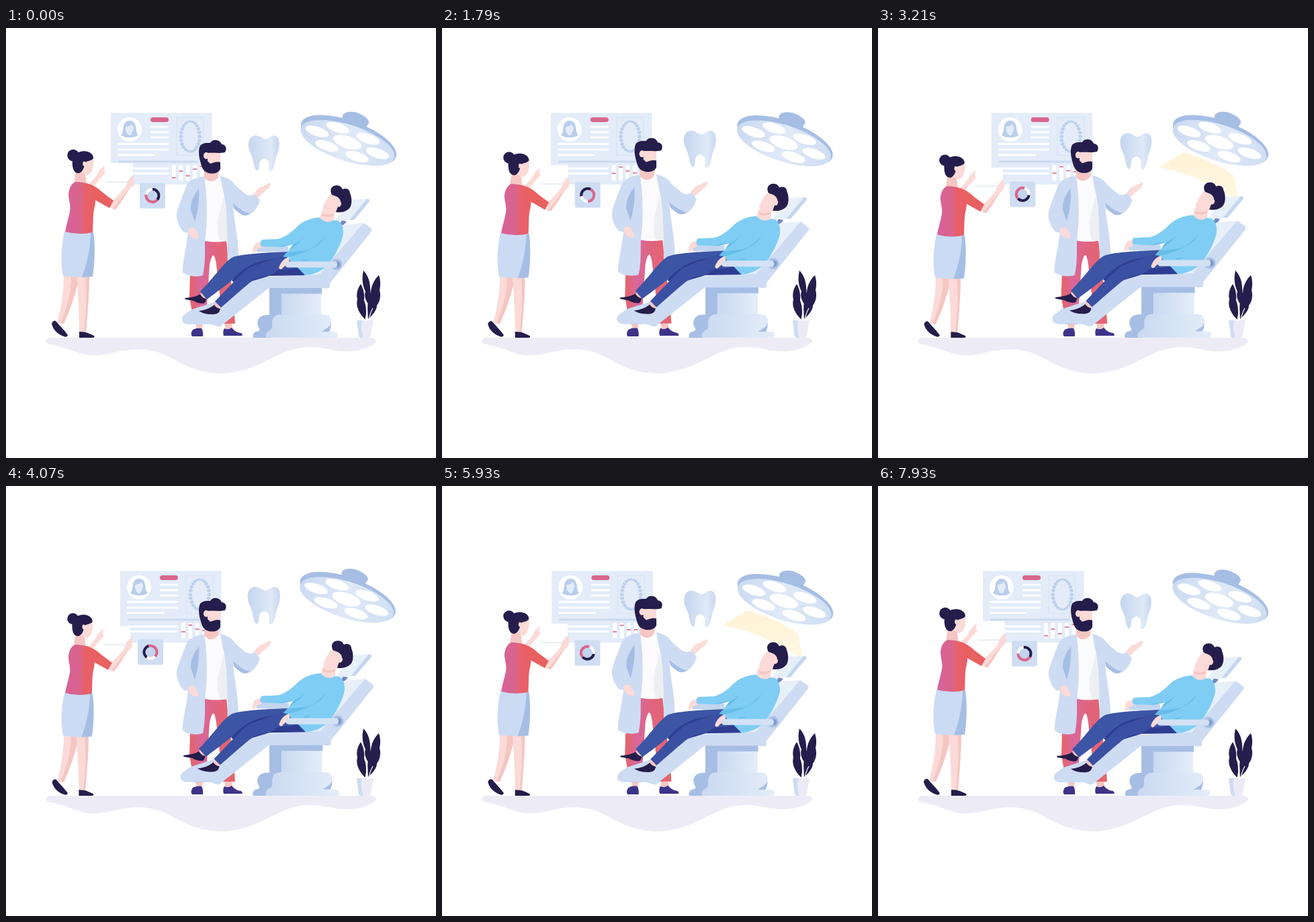
These frames come from a looping animation (640x640 px, 8000 ms). An HTML page:

```html
<!DOCTYPE html>
<html lang="en">
<head>
<meta charset="utf-8">
<title>Dental clinic</title>
<style>
  html, body { margin: 0; width: 100%; height: 100%; overflow: hidden; background: #fff; }
  svg { display: block; width: 100vw; height: 100vh; }
  .skin { fill: #fbdad7; }
  .skin2 { fill: #f5c6c3; }
  .dark { fill: #251d4b; }
  .blue { fill: #cddcf3; }
  .deep { fill: #a6bee4; }
  .pale { fill: #e7eff9; }
  .white { fill: #fff; }
</style>
</head>
<body>
<svg viewBox="0 0 640 640" xmlns="http://www.w3.org/2000/svg">
  <defs>
    <linearGradient id="tooth-fill">
      <stop offset="0" stop-color="#c5d6ef"/><stop offset=".72" stop-color="#dfe9f7"/><stop offset="1" stop-color="#c6d7f0"/>
    </linearGradient>
    <linearGradient id="steel">
      <stop offset="0" stop-color="#c9d9f1"/><stop offset="1" stop-color="#e4edf9"/>
    </linearGradient>
    <linearGradient id="lamp-fill">
      <stop offset="0" stop-color="#cbdaf2"/><stop offset=".5" stop-color="#dfe9f7"/><stop offset="1" stop-color="#cfdef3"/>
    </linearGradient>
    <linearGradient id="top-fill">
      <stop offset="0" stop-color="#d7629a"/><stop offset=".54" stop-color="#d9648a"/><stop offset=".6" stop-color="#e8616b"/><stop offset="1" stop-color="#e85f65"/>
    </linearGradient>
    <linearGradient id="pants-fill">
      <stop offset="0" stop-color="#e5646a"/><stop offset=".1" stop-color="#e06479"/><stop offset=".25" stop-color="#d9679b"/><stop offset=".55" stop-color="#e06580"/><stop offset="1" stop-color="#e7636a"/>
    </linearGradient>
    <linearGradient id="beam-fill" x2="0" y2="1">
      <stop offset="0" stop-color="#fff3d6"/><stop offset="1" stop-color="#fff7e3"/>
    </linearGradient>
  </defs>

  <path fill="#edecf6" d="M64 461H545Q552 463 551 467C540 479 515 484 490 480C470 476 450 471 425 479C395 488 370 511 325 514C280 515 260 497 235 486C210 475 185 478 165 482C140 488 125 489 110 484C90 477 75 472 62 470Q56 465 64 461Z"/>

  <g id="panel">
    <rect x="156" y="126.500" width="150.500" height="106.500" fill="#e3ecf8"/>
    <circle class="white" cx="184" cy="151" r="18"/>
    <path fill="#b9ceec" d="M171 159C175 156 174 150 175 146C177 135 191 135 193 146C194 150 193 156 197 159Q193 163 184 163Q175 163 171 159Z"/>
    <path fill="#e3ecf8" d="M178 147Q185 146 187 143L190 148C190 153 187 156 187 158Q184 162 181 158C179 156 178 153 178 147Z"/>
    <rect x="215" y="133" width="27" height="7" rx="3.500" fill="#d9668c"/>
    <g id="rows" class="white"></g>
    <rect x="167" y="197.500" width="118" height="3" fill="#cbdaf1"/>
    <rect x="254" y="133.500" width="40" height="56" fill="none" stroke="#c6d6ee" stroke-width=".7" stroke-dasharray="1.500 1"/>
    <g id="beads" fill="#bdd0ec"></g>
    <g id="bars"></g>
  </g>

  <g id="card">
    <path class="white" d="M147 201H188.500V237H147Z"/>
    <path fill="#e0e9f6" d="M148 228.500H189V230H148Z"/>
  </g>

  <g id="chart">
    <rect x="199" y="230.500" width="38" height="38" rx="3" fill="#cfddf3"/>
    <circle cx="218" cy="249.500" r="7.500" fill="#c3d4ee"/>
    <g id="donut" fill="none" stroke-width="4"></g>
  </g>

  <g id="doctor">
    <path class="skin2" d="M282 436H293L292 450H284ZM324 436H336L337 449H327Z"/>
    <path fill="#3d3489" d="M278 449Q284 446 291 447Q294 452 293 459H277Q274 455 278 449ZM325 447Q331 450 336 446Q341 453 350 454Q353 457 351 458H324Q322 452 325 447Z"/>
    <path fill="url(#pants-fill)" d="M296 316H328C331 345 334 375 338 400L341 440H323L313 352Q309 325 303 352L297 441H280L273 400L274 366H293Z"/>
    <path fill="#fbfbfd" d="M295 222H322C327 245 330 290 329 317Q312 320 296 317Z"/>
    <path fill="#eeeff3" d="M323 250C321 270 314 280 315 296Q315 310 319 318L329 317C330 290 328 270 323 250Z"/>
    <path class="blue" d="M295 221C284 222 272 226 268 236C262 252 256 266 254 276C253 288 260 300 265 304L271 305C269 325 262 352 263 364C270 370 285 371 293 368C297 350 296 330 296 317C300 290 300 250 295 221Z"/>
    <path class="deep" d="M287 239C278 250 274 262 275 271L281 288C285 276 288 260 287 239Z"/>
    <path class="skin" d="M271 303C270 298 276 296 281 298L286 307Q289 314 284 313.500C277 313 273 310 271 303Z"/>
    <path class="blue" d="M319 220C332 223 337 228 342 235L355 246Q360 250 364 249C367 249 370 248 371 246L378 257C374 268 368 277 358 279C350 277 344 269 338 264C339 285 347 318 346 342L330 352C329 320 331 270 322 238Z"/>
    <path class="deep" d="M338 261C347 269 354 274 363 276Q357 281 351 278C345 274 340 270 339 268Z"/>
    <path class="skin" d="M369 247C374 240 377 236 382 236L391 231Q396 230 393 235L391 239C387 240 386 244 382 246L376 252Z"/>
    <path class="skin2" d="M295 210H317L316 222Q306 234 295 223Z"/>
    <path class="skin" d="M297 183H319V205H297Z"/>
    <path class="dark" d="M289 198C287 190 286 181 289 175C294 170 300 171 304 171C307 165 318 165 321 173C328 174 329 180 326 185C318 187 308 185 300 186V198L304 202C308 201 314 198 319 200V210C316 217 306 218 299 215C292 212 291 205 289 198Z"/>
    <ellipse class="skin" cx="298" cy="190" rx="4" ry="5"/>
  </g>

  <path id="beam" fill="url(#beam-fill)" d="M418 207L455 185C480 193 506 203 528 218Q533 230 537 257L505 240C480 224 450 214 418 207Z"/>

  <g id="chair">
    <path class="deep" d="M392 385H470V396H410V427H392ZM368 461Q366 452 376 451C381 448 372 445 375 435Q378 427 390 427H410L392 461Z"/>
    <path fill="url(#steel)" d="M410 395.500H469V427H410Z"/>
    <path class="deep" d="M470 428H480Q487 440 481 452H468Z"/>
    <path fill="url(#steel)" d="M387 461C385 454 390 451 394 449C399 444 393 437 399 430Q402 426.500 408 426.500H470C480 426 485 432 484 437C483 446 474 448 470 452H489Q495 453 494 457Q494 461 490 461Z"/>
    <path fill="#7389c6" d="M500 286L507 288L501 295L496 293Z"/>
    <path class="pale" d="M511 256L538 254Q542 255 541 258L517 286L490 287Z"/>
    <path fill="#c5d6f0" d="M537 254.500Q542 254 541 258L518 285.500L511 286Z"/>
    <path class="pale" d="M501 293L531 290L480 377L448 368Z"/>
    <path class="blue" d="M532 290L543 298Q546 300 543 304L482 380L482 387L474 388L463 371Z"/>
    <path class="blue" d="M481 387H391L318 445L305 441H272C262 441 259 433 265 427L276 419L310 408L352 372L482 366Z"/>
    <path fill="#c3d5ef" d="M374 325H420V333.500H374Q371 330 374 325Z"/>
    <path class="skin" d="M381 318L372 320Q367 325 367 333Q370 337 374 329L381 326Z"/>
    <path class="skin2" d="M288 397L292 393L301 401L296 405ZM309 412L313 406L321 414L317 419Z"/>
    <path fill="#3c55a5" d="M420 333C392 334 352 336 338 341C325 347 309 373 289 392L299 404C315 392 330 381 338 374L425 362Z"/>
    <path fill="#2e3d91" d="M336 376C350 360 365 350 385 346L428 337L445 368L392 369L345 383Z"/>
    <path fill="#3a50a2" d="M416 336L429 349C437 360 420 359 406 360L392 369C383 369 374 371 363 379C347 392 333 405 320 416L311 407C328 390 345 370 360 358C375 350 395 346 416 336Z"/>
    <path class="dark" d="M266 402C275 401 283 400 289 396Q292 402 298 403Q298 408 294 410Q285 410 279 406L267 404ZM287 421C298 420 305 416 310 412Q313 417 319 418L317 423Q312 427 305 426C298 426 291 424 287 421Z"/>
    <path class="skin" d="M470 272L489 273L488 288Q474 294 466 289Z"/>
    <path class="skin2" d="M471 276Q482 280 489 274L488 279Q478 283 470 279Z"/>
    <path fill="#7fcdf4" d="M467 282C452 283 441 288 433 296C424 305 414 312 405 314L381 315C378 318 378 322 380 325L410 326C418 325 424 321 428 321C424 328 420 332 415 337L445 368C460 367 470 361 478 354C490 340 502 315 502 304C502 294 498 290 495 287L488 286Q477 293 467 282Z"/>
    <path fill="#67bde9" d="M447 305C440 319 423 326 405 325L428 321L421 330Q437 323 447 305ZM483 305C472 311 462 328 446 331L418 334L412 340L445 347C462 344 472 322 483 305Z"/>
    <path fill="#7fcdf4" d="M492 290C503 293 503 305 497 312C485 325 472 338 459 343L424 348L419 341C440 337 458 328 468 320Z"/>
    <path class="skin" d="M421 341C413 343 408 350 406 357Q409 362 413 356L422 349Z"/>
    <ellipse fill="#c6d7f0" cx="491" cy="352" rx="10" ry="9.500"/>
    <circle class="deep" cx="492" cy="352" r="8"/>
    <circle fill="#819bd0" cx="493" cy="352" r="4.500"/>
    <rect x="416" y="347.500" width="77" height="9" rx="4" fill="#d3e1f5"/>
    <path class="skin" d="M486 245C479 251 473 261 471 269Q473 277 484 277L491 275L498 266L497 247Z"/>
    <path class="dark" d="M485 248C480 239 487 233 494 234.500C499 235 500 239 501 240C507 237 512 241 512 246C515 252 515 262 512 267C507 274 498 275 491 274L494 266L498 258C496 250 488 250 485 248Z"/>
    <ellipse class="skin" cx="496" cy="262.500" rx="3" ry="4" transform="rotate(25 496 262)"/>
  </g>

  <path id="tooth" fill="url(#tooth-fill)" d="M361 177C360 164 366 160 372 160C378 160 380 164 386 165.500C391 164 394 160 400 160C406 161 408 170 406 179C405 187 402 190 401 197C399 206 397 213 393 213C390 213 392 205 391 200C390 196 386 194 383.500 194.500C379 195 377 200 377 205C376 211 375 214 373 212C369 209 369 200 367 194C365 187 362 184 361 177Z"/>

  <g id="lamp">
    <path class="deep" d="M501 130C504 124 515 123 525 127C535 131 541 137 540 141L533 153L500 143Z"/>
    <ellipse class="deep" cx="510" cy="166.500" rx="75" ry="28.500" transform="rotate(20 510 166.500)"/>
    <ellipse cx="508.500" cy="171" rx="73" ry="27" fill="url(#lamp-fill)" transform="rotate(18 508.500 171)"/>
    <g id="bulbs" class="white"></g>
  </g>

  <g id="woman">
    <path class="skin" d="M86 368L106 370C102 395 95 415 86 440L76 439C82 415 86 395 86 368Z"/>
    <path class="skin2" d="M97 370H107V380C102 400 95 421 86 440L81 440C91 415 97 395 97 370Z"/>
    <path class="skin" d="M105 369H124C124 395 121 430 119 453H109C109 420 107 395 105 369Z"/>
    <path class="skin2" d="M118 369H124C124 395 121 430 119 453H116C119 425 121 395 118 369Z"/>
    <path class="dark" d="M68 440Q70 435 74 436C80 443 88 451 92 457Q91 461 86 459C78 456 70 450 68 440ZM109 452Q117 452 122 454L131 458Q133 461 129 461H109Z"/>
    <path class="skin" d="M123 232C131 225 136 219 138 213L146 205Q148 206 145 212L148 215Q143 222 138 226L130 237Z"/>
    <path class="skin2" d="M104 213L117 211L120 233L101 232Z"/>
    <path fill="url(#top-fill)" d="M104 229C97 231 94 239 93 247C93 256 97 264 95 273C93 284 89 296 88 304Q108 310 129 305C130 290 129 275 132 266C134 256 134 245 132 238C122 229 112 230 104 229Z"/>
    <path class="skin" d="M157 258C167 250 173 242 178 236L182 226C186 222 187 219 190 220L191 229Q191 235 184 239C176 251 170 262 163 270L155 267Z"/>
    <path class="skin2" d="M187 235L184 239C176 251 170 262 163 270L158 269C169 258 178 244 187 235Z"/>
    <path fill="#e8605f" d="M118 231C128 232 138 239 144 245L160 257L154 268L131 255Z"/>
    <path fill="#cadbf3" d="M87 303Q108 309 130 304C133 325 132 350 129 370Q108 372 85 369C81 350 82 325 87 303Z"/>
    <path class="deep" d="M126 305L130 304C133 325 132 350 129 370L113 371C121 350 126 325 126 305Z"/>
    <path class="skin" d="M113 196Q122 196 130 193C132 206 128 217 121 219L111 214Z"/>
    <circle class="dark" cx="100" cy="189.500" r="8.700"/>
    <path class="dark" d="M99 194C103 184 115 181 124 185Q130 188 130 194C126 199 120 197 117 201C117 207 114 214 109 216C100 217 98 207 99 194Z"/>
    <ellipse class="skin" cx="116.500" cy="202" rx="2.300" ry="3.500"/>
  </g>

  <g>
    <path class="dark" d="M528 381C523 388 521 396 523 404C520 414 526 426 535 434C537 424 536 412 533 406C534 396 532 388 528 381ZM532 361C529 374 531 384 535 392C532 400 537 408 540 412C545 402 542 392 542 385C541 373 537 366 532 361ZM555 368C547 375 543 386 543 394C537 405 538 420 539 433C545 428 552 420 552 413C559 404 557 393 556 390C558 382 557 374 555 368Z"/>
    <path fill="none" stroke="#fff" stroke-width="1.200" d="M535 435Q536 428 538 422M540 435Q541 426 546 417"/>
    <path fill="#ecebf5" d="M522 435H547L543 458Q542 461 539 461H529Q526 461 525 458Z"/>
    <path fill="#cddcf2" d="M522 435H530Q527 448 532 461H529Q526 461 525 458Z"/>
  </g>
</svg>
<script>
const LOOP = 8000, TAU = Math.PI * 2;
const $ = id => document.getElementById(id);

function add(parent, tag, attrs) {
  const el = document.createElementNS('http://www.w3.org/2000/svg', tag);
  for (const k in attrs) el.setAttribute(k, attrs[k]);
  return $(parent).appendChild(el);
}

// x, y, width of the white text lines
[[215, 147, 27], [215, 155, 27], [215, 163, 27], [166, 172.5, 76], [166, 181, 76],
 [166, 189, 56], [167, 209, 75], [167, 216.5, 75]]
  .forEach(([x, y, width]) => add('rows', 'rect', { x, y: y - 1.5, width, height: 3 }));

for (let i = 0; i < 24; i++) {
  const a = i / 24 * TAU, side = Math.abs(Math.sin(a));
  add('beads', 'ellipse', {
    cx: 274.3 + 14 * Math.sin(a), cy: 161.5 - 22.5 * Math.cos(a),
    rx: 1.7 + side * 1.2, ry: 2 + side * 0.5
  });
}

[[463, 154], [494, 148.5], [539, 165], [508, 170, 22, 9], [477.5, 175.5], [522.5, 191.5], [553, 186.5]]
  .forEach(([cx, cy, rx = 18, ry = 7]) =>
    add('bulbs', 'ellipse', { cx, cy, rx, ry, transform: `rotate(18 ${cx} ${cy})` }));

[['#251d4b', 0, 130], ['#d9668c', 130, 150], ['#fff', 280, 80]].forEach(([stroke, from, size]) =>
  add('donut', 'circle', {
    cx: 218, cy: 249.5, r: 9.5, stroke, pathLength: 360,
    'stroke-dasharray': `${size} ${360 - size}`, transform: `rotate(${from - 90} 218 249.5)`
  }));

// Tick heights on each bar at the key times
const times = [0, 1070, 2430, 4070, 5930, 7070, 8000];
const levels = [
  [223, 218, 215, 217, 217, 223, 223],
  [213, 208, 206, 207, 207.5, 213, 213],
  [220, 214, 212, 213, 214, 220, 220],
  [210, 219, 213, 215, 214, 211, 210],
  [206, 213, 211, 210, 210, 206, 206]
];
const ticks = levels.map((_, i) => {
  const x = 247 + i * 10.4;
  add('bars', 'rect', { x, y: 204, width: 5.8, height: 23, class: 'white' });
  return add('bars', 'rect', { x, width: 5.8, height: 1.6, fill: '#d9668c' });
});

const wave = (t, period) => (1 - Math.cos(TAU * t / period)) / 2;
const ramp = (t, a, b) => Math.min(1, Math.max(0, (t - a) / (b - a)));
const pulse = (t, a, b, c, d) => ramp(t, a, b) * (1 - ramp(t, c, d));
const move = (id, value) => $(id).setAttribute('transform', value);
const scale = (id, x, y, sx, sy, dy = 0) =>
  move(id, `translate(${x} ${y + dy}) scale(${sx} ${sy}) translate(${-x} ${-y})`);

function level(list, t) {
  let i = 0;
  while (i < times.length - 2 && t >= times[i + 1]) i++;
  const p = ramp(t, times[i], times[i + 1]);
  return list[i] + (list[i + 1] - list[i]) * (1 - Math.cos(Math.PI * p)) / 2;
}

function draw(t) {
  const slow = wave(t, LOOP);
  move('panel', `translate(${14 * slow} 0)`);
  move('chart', `translate(${-3 * slow} ${-2.3 * slow})`);
  const turn = t / LOOP;
  move('donut', `rotate(${1080 * turn + 25 * Math.sin(Math.PI * turn)} 218 249.5)`);
  ticks.forEach((el, i) => el.setAttribute('y', level(levels[i], t) - 0.8));

  const squat = 1 - 0.03 * slow;
  scale('woman', 88, 461, squat, squat);
  scale('card', 88, 461, squat, squat);

  const breath = wave(t, LOOP / 2);
  scale('doctor', 315, 460, 1 + 0.018 * breath, 1 + 0.01 * breath);

  // The chair swells quickly and settles slowly
  const swell = 1 + 0.0195 * (t < 3200 ? wave(t, 6400) : wave(LOOP - t, 9600));
  scale('chair', 390, 460, swell, swell);

  const lift = wave(t, LOOP / 3);
  scale('tooth', 383.7, 186.5, 1 + 0.055 * lift, 1 + 0.055 * lift, -8.5 * lift);

  const sway = -Math.sin(TAU * t / 3200);
  move('lamp', `translate(${1.4 * sway} ${1.6 * sway})`);
  $('beam').setAttribute('opacity',
    pulse(t, 2380, 2700, 3400, 3700) + pulse(t, 5580, 5900, 6600, 6900));
}

const start = performance.now();
function tick() {
  draw((performance.now() - start) % LOOP);
  requestAnimationFrame(tick);
}
tick();
</script>
</body>
</html>
```
